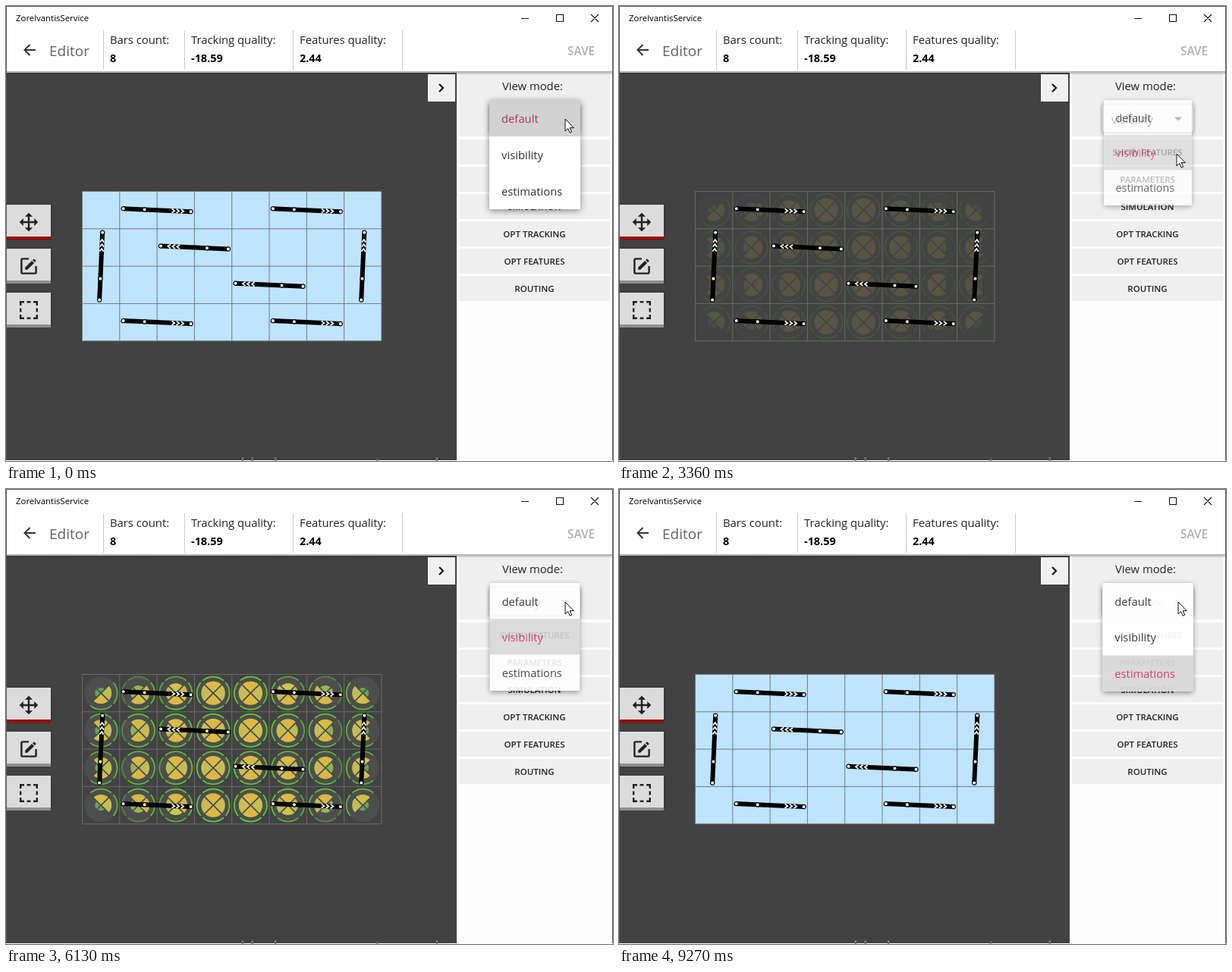
Recreate the animation shown at these times as an HTML page. Size 800 by 600 pixels, loop 9340 ms.

```html
<!DOCTYPE html>
<html lang="en">
<head>
<meta charset="utf-8">
<title>Editor</title>
<style>
html, body { margin: 0; width: 100%; height: 100%; overflow: hidden; background: #fff; }
svg { display: block; width: 800px; height: 600px; }
text { font-family: "Open Sans", "Noto Sans", sans-serif; font-size: 14.8px; fill: #222; white-space: pre; }
.bold { font-weight: 700; font-size: 14.4px; fill: #000; }
.action { font-weight: 600; font-size: 11.5px; text-anchor: middle; }
.raised { filter: drop-shadow(0 1px 2px rgba(0,0,0,.35)); }
.floating { filter: drop-shadow(0 2px 4px rgba(0,0,0,.45)); }
</style>
</head>
<body>
<svg id="stage" viewBox="0 0 800 600"></svg>
<script>
const LOOP = 9340, FADE = 200;
const OPTIONS = ['default', 'visibility', 'estimations'];
const ACTIONS = ['SHOW FEATURES', 'PARAMETERS', 'SIMULATION', 'OPT TRACKING', 'OPT FEATURES', 'ROUTING'];
const GRID = { x: 100.5, y: 244.5, cols: 8, rows: 4, cell: 49.3 };
const GRID_W = GRID.cols * GRID.cell, GRID_H = GRID.rows * GRID.cell;
const CENTER = { x: GRID.x + GRID_W / 2, y: GRID.y + GRID_H / 2 };

// Each round: pick an option, reach the button, show and hide features, reopen the menu.
const ROUNDS = [
  { pick: 110, reach: 780, show: 850, hide: 1970, open: 2810 },
  { pick: 3300, reach: 3850, show: 4180, hide: 5300, open: 6000 },
  { pick: 6630, reach: 7180, show: 7320, hide: 8580, open: 9120 },
];
const MENU_SPOT = [737, 149], BUTTON_SPOT = [762, 190];

const range = n => [...Array(n).keys()];
const clamp = x => Math.max(0, Math.min(1, x));
const rect = (x, y, w, h, fill, more = '') =>
  `<rect x="${x}" y="${y}" width="${w}" height="${h}" fill="${fill}" ${more}/>`;
const text = (x, y, str, more = '') => `<text x="${x}" y="${y}" ${more}>${str}</text>`;
const path = (d, more = '') => `<path d="${d}" ${more}/>`;
const line = (d, color, width, more = '') =>
  path(d, `fill="none" stroke="${color}" stroke-width="${width}" ${more}`);
const circle = (x, y, r, more) => `<circle cx="${x}" cy="${y}" r="${r}" ${more}/>`;

let seed = 11;
const random = () => (seed = seed * 16807 % 2147483647) / 2147483647;

function gridLines(color) {
  const v = range(GRID.cols + 1).map(i => `M${GRID.x + i * GRID.cell} ${GRID.y}v${GRID_H}`);
  const h = range(GRID.rows + 1).map(i => `M${GRID.x} ${GRID.y + i * GRID.cell}h${GRID_W}`);
  return line(v.concat(h).join(''), color, 1);
}

// A bar is centred on a cell position, turned by quarters with a slight tilt.
const bar = (col, row, turn) =>
  ({ x: GRID.x + col * GRID.cell, y: GRID.y + row * GRID.cell, angle: turn * 90 + 2.6 });
const BARS = [
  ...[.5, 3.5].flatMap(row => [2, 6].map(col => bar(col, row, 0))),
  ...[0, 1].flatMap(i => [bar(3 + 2 * i, 1.5 + i, 2), bar(.5 + 7 * i, 2, -1)]),
];

function bars(body, detail) {
  const dots = [-44.5, -16.5, 44.5]
    .map(x => circle(x, 0, 2.6, `fill="${detail}" stroke="${body}" stroke-width="1.2"`)).join('');
  const arrows = line(range(3).map(i => `M${19.5 + 6 * i} -2.6l3.6 2.6l-3.6 2.6`).join(''), detail, 1.7);
  const shape = line('M-44.5 0H44.5', body, 6) + arrows + dots;
  return BARS.map(b => `<g transform="translate(${b.x} ${b.y}) rotate(${b.angle})">${shape}</g>`).join('');
}

function arc(r, angle, half, closed) {
  const at = a => `${(r * Math.cos(a)).toFixed(2)} ${(r * Math.sin(a)).toFixed(2)}`;
  return `M${closed ? '0 0L' : ''}${at(angle - half)}A${r} ${r} 0 0 1 ${at(angle + half)}${closed ? 'Z' : ''}`;
}

// Four wedges and ring arcs; they shrink where a side looks out of the field.
function gauge(col, row) {
  const off = Math.abs(col - 3.5) - .5;
  const outerX = col < 4 ? 2 : 0, outerY = row === 0 ? 3 : row === 3 ? 1 : -1;
  let out = circle(0, 0, 22, 'fill="#4d4d4d"');
  for (const side of range(4)) {
    const loss = side === outerX ? .25 : side === outerY ? .27 : .05;
    const v = 1 - loss * off, angle = side * Math.PI / 2;
    const hue = (side % 2 ? 47 : 53) + 95 * (1 - v) ** 1.6;
    const color = `hsl(${hue},${20 + (side % 2 ? 48 : 32) * v}%,${48 + 8 * v}%)`;
    out += path(arc(6 + 10.5 * v, angle, Math.PI / 4, true), `fill="${color}" stroke="#4d4d4d" stroke-width="1.6"`);
    if (v > .35) out += line(arc(21.5, angle, .7), `rgba(92,208,48,${v})`, 1.7);
  }
  return `<g transform="translate(${GRID.x + (col + .5) * GRID.cell} ${GRID.y + (row + .5) * GRID.cell})">${out}</g>`;
}

// Features sit on a lattice of sixth cells, densest along the middle row.
const lattice = (spread, steps) => Math.round(spread * steps) * GRID.cell / 6;
const FEATURES = range(46).map(() => ({
  x: CENTER.x + lattice(random() * 2 - 1, 15),
  y: CENTER.y + lattice(random() + random() - 1, 7),
}));

function featureRays() {
  let rays = '';
  for (const b of BARS) {
    const turn = b.angle * Math.PI / 180;
    const hx = b.x - 21 * Math.cos(turn), hy = b.y - 21 * Math.sin(turn) + 2;
    for (const { x, y } of FEATURES)
      if (Math.hypot(x - hx, y - hy) < 235 && random() < .5) rays += `M${hx} ${hy}L${x} ${y}`;
  }
  return line(rays, '#008000', .9);
}

const header = () => rect(0, 0, 800, 88, '#fff')
  + text(13, 20, 'ZorelvantisService', 'style="font-size:11.4px;fill:#000"')
  + line('M679 16.5h10M725.5 11.5h9v9h-9zM771 11l10 10M781 11l-10 10', '#111', 1.1)
  + line('M39 58H25M31.5 51l-7 7l7 7', '#333', 2)
  + text(57, 66, 'Editor', 'style="font-size:19px;fill:#606060"')
  + line('M128.5 32v52M235.5 32v52M378.5 32v52M522.5 32v52', '#ccc', 1)
  + [[137, 'Bars count:', '8'], [244, 'Tracking quality:', '-18.59'], [387, 'Features quality:', '2.44']]
    .map(([x, name, value]) => text(x, 50, name) + text(x, 74, value, 'class="bold"')).join('')
  + text(740, 65, 'SAVE', 'style="font-weight:600;font-size:15.4px;fill:#b0b0b0"');

const ICONS = [
  'M13 6V11H18V7.75L22.25 12L18 16.25V13H13V18H16.25L12 22.25L7.75 18H11V13H6V16.25L1.75 12L6 7.75V11H11V6H7.75L12 1.75L16.25 6Z',
  'M5 3C3.9 3 3 3.9 3 5V19A2 2 0 0 0 5 21H19A2 2 0 0 0 21 19V12H19V19H5V5H12V3ZM17.8 4L16.1 5.4L18.6 7.9L19.8 6.7Q20.3 6.2 19.8 5.7L18.3 4.2ZM15.4 6.1L8 13.5V16H10.5L17.9 8.6Z',
  'M2 2H7V4H4V7H2ZM10 2H14V4H10ZM17 2H22V7H20V4H17ZM20 10H22V14H20ZM20 17H22V22H17V20H20ZM10 20H14V22H10ZM2 17H4V20H7V22H2ZM2 10H4V14H2Z',
];
const toolbar = () => ICONS.map((d, i) => {
  const y = 262 + 58 * i;
  return rect(1, y, 58, 42, '#dcdcdc', 'class="raised"') + rect(1, y + 42, 58, 4, i ? '#8f8f8f' : '#a00000')
    + path(d, `transform="translate(15.6 ${y + 8.6}) scale(1.2)" fill="#222"`);
}).join('');

const sidebar = () => rect(594, 88, 206, 511, '#fdfdfd') + rect(597, 88, 199, 84, '#efefef')
  + text(654, 111, 'View mode:')
  + rect(637, 130, 120, 36, '#f6f6f6', 'rx="2" class="raised"')
  + text(649, 154.5, '', 'id="selected" clip-path="url(#labelClip)"')
  + path('M732 146.5h10l-5 5z', 'fill="#111"')
  + ACTIONS.map((name, i) => rect(597, 176 + 36 * i, 199, 33, '#efefef', i ? '' : 'id="button"')
    + text(696.5, 197 + 36 * i, name, 'class="action"')).join('');

const menu = () => '<g id="menu">' + rect(637, 124, 120, 144, '#fff', 'rx="2" class="floating"')
  + OPTIONS.map((name, i) => rect(637, 124 + 48 * i, 120, 48, '#fff', `id="row${i}"`)
    + text(653, 154 + 48 * i, name, `id="item${i}"`)).join('') + '</g>';

document.getElementById('stage').innerHTML =
  '<defs><clipPath id="labelClip"><rect x="645" y="130" width="73" height="36"/></clipPath>'
  + '<clipPath id="footClip"><rect x="0" y="595" width="800" height="5"/></clipPath>'
  + '<linearGradient id="shade" x2="0" y2="1"><stop stop-opacity=".35"/><stop offset="1" stop-opacity="0"/></linearGradient></defs>'
  + rect(0, 0, 800, 600, '#fff') + rect(0, 88, 594, 511, '#424242')
  + '<g id="view"><g id="plain">' + rect(GRID.x, GRID.y, GRID_W, GRID_H, '#bfe4ff') + gridLines('#74797d') + '</g>'
  + '<g id="dark">' + gridLines('#6a6a6a') + '<g id="gauges">'
  + range(GRID.rows).map(r => range(GRID.cols).map(c => gauge(c, r)).join('')).join('') + '</g></g>'
  + bars('#000', '#fff') + '</g>'
  + '<g id="features">' + rect(GRID.x, GRID.y, GRID_W, GRID_H, 'none', 'id="outline" stroke="#666"')
  + bars('#282a2b', '#555859') + featureRays()
  + FEATURES.map(({ x, y }) => circle(x, y, 8, 'fill="none" stroke="#f00" stroke-width="1.2"')).join('') + '</g>'
  + toolbar() + rect(556, 90, 36, 36, '#f0f0f0') + line('M571 103l5 5l-5 5', '#111', 2.2)
  + sidebar() + header() + rect(0, 86, 800, 5, 'url(#shade)')
  + line('M.5 599V.5H799.5V599', '#555', 1)
  + '<g clip-path="url(#footClip)">' + text(308, 615, 'Ha lasso const rpoekma', 'style="font-size:28px;fill:#777"') + '</g>'
  + menu() + circle(0, 0, 12, 'id="press" fill="#e9e968"')
  + path('M0 0V16L3.7 12.5L6.2 18.2L8.6 17.1L6.2 11.6H11.3Z', 'id="pointer" fill="#fff" stroke="#111" stroke-linejoin="round"');

const parts = {};
document.querySelectorAll('[id]').forEach(node => parts[node.id] = node);
const set = (id, name, value) => parts[id].setAttribute(name, value);
const show = (id, on) => set(id, 'display', on ? 'inline' : 'none');

function glide(from, to, t, start, end) {
  const p = clamp((t - start) / (end - start)), e = p * p * (3 - 2 * p);
  return from.map((v, i) => v + (to[i] - v) * e);
}

const optionSpot = mode => [MENU_SPOT[0] - 2 * mode, MENU_SPOT[1] + 46 * mode];

function pointerAt(t, mode) {
  const { pick, reach, hide, open } = ROUNDS[mode];
  if (t < hide) return glide(optionSpot(mode), BUTTON_SPOT, t, pick + FADE, reach);
  if (t < open) return glide(BUTTON_SPOT, MENU_SPOT, t, hide + 70, open - 190);
  const next = (mode + 1) % ROUNDS.length;
  return glide(MENU_SPOT, optionSpot(next), t, open + FADE, ROUNDS[next].pick + (next ? 0 : LOOP));
}

function menuAmount(t, { pick, open }) {
  return t < open ? 1 - clamp((t - pick) / FADE) : 1 - (1 - clamp((t - open) / FADE)) ** 2;
}

function render(now) {
  const t = now % LOOP;
  const mode = ROUNDS.filter((r, i) => !i || r.pick <= t).length - 1;
  const round = ROUNDS[mode];
  const open = menuAmount(t, round), [x, y] = pointerAt(t, mode);
  const features = t >= round.show && t < round.hide;

  show('plain', mode !== 1);
  show('dark', mode === 1);
  set('gauges', 'opacity', .15 + .85 * clamp((t - round.pick - 60) / 350));
  set('view', 'opacity', features ? (mode === 1 ? .18 : .14) : 1);
  show('features', features);
  show('outline', mode === 1);

  parts.selected.textContent = OPTIONS[mode];
  set('button', 'fill', !open && y >= 176 ? '#dadada' : '#efefef');
  show('menu', open > 0);
  set('menu', 'opacity', open);
  set('menu', 'transform', `translate(697 124) scale(${.88 + .12 * open}) translate(-697 -124)`);
  const hover = open === 1 ? Math.floor((y - 124) / 48) : -1;
  OPTIONS.forEach((_, i) => {
    const chosen = i === mode, both = chosen && i === hover;
    set('row' + i, 'fill', both ? '#d2d2d2' : chosen ? '#d9d9d9' : i === hover ? '#eee' : '#fff');
    parts['item' + i].style.fill = both ? '#a33a5c' : chosen ? '#dc2f6c' : '#333';
  });

  show('press', features);
  set('press', 'transform', `translate(${x - 1} ${y})`);
  set('pointer', 'transform', `translate(${x} ${y})`);
}

const begin = performance.now();
function tick() {
  render(performance.now() - begin);
  requestAnimationFrame(tick);
}
tick();
</script>
</body>
</html>
```
